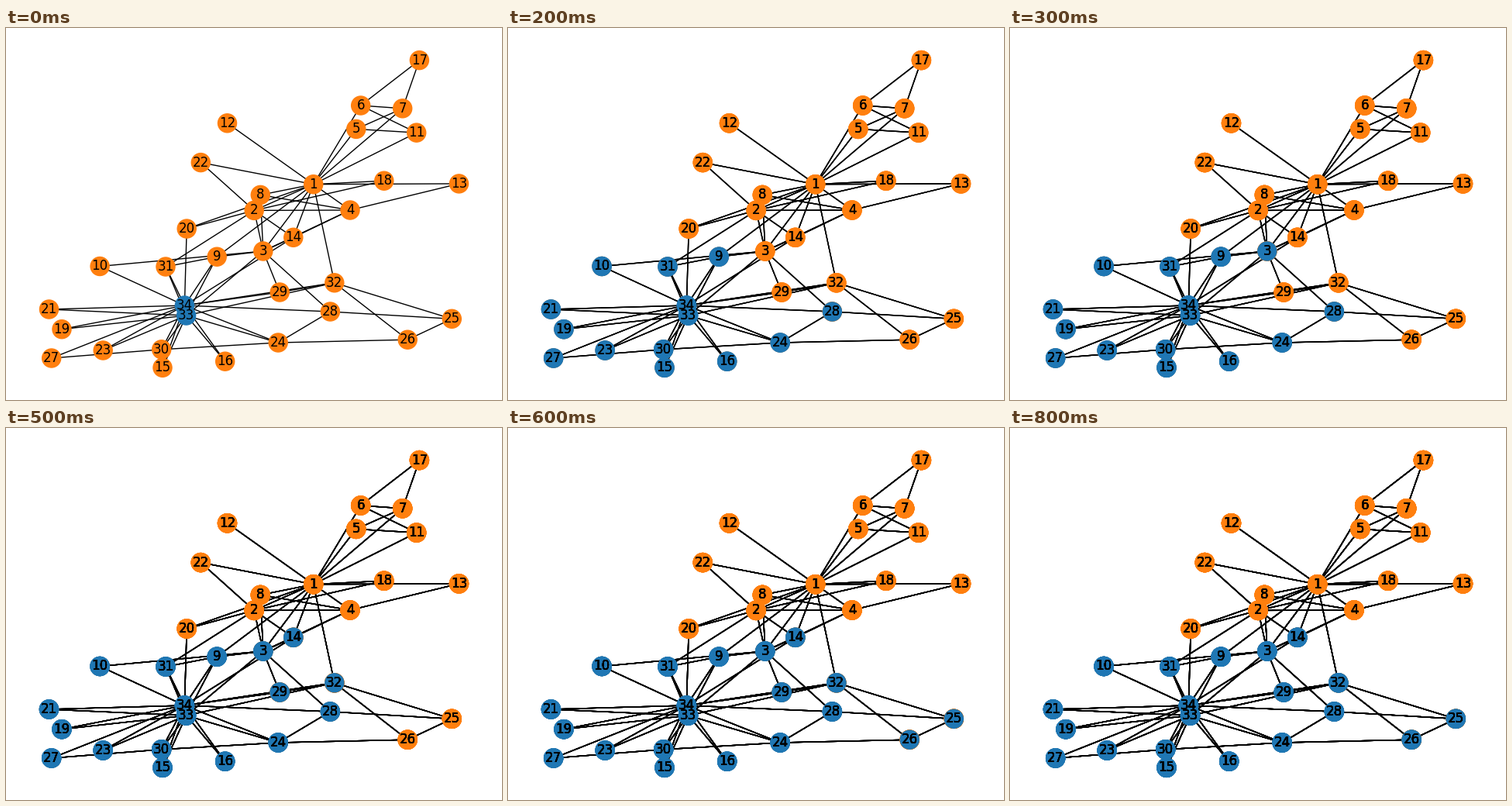
A matplotlib script for the animation above (0.9 s loop, 640 by 480 pixels).

```python
from itertools import combinations, product

import matplotlib.pyplot as plt
from matplotlib.animation import FuncAnimation
from matplotlib.collections import LineCollection

W, H, DPI = 640, 480, 100
STEPS, INTERVAL = 9, 100
ORANGE, BLUE = "#ff7f0e", "#1f77b4"

# Node centres in pixels, in node order from 1
POINTS = [
    (396.7, 201.7), (320.2, 235.4), (331.8, 288), (444, 235), (451.8, 130.4),
    (457.7, 100), (511.7, 103.8), (328.3, 215.4), (272.2, 295.2), (121.1, 307.5),
    (529.7, 135.1), (285.5, 122.8), (584.5, 200.9), (370.8, 270.3),
    (202, 438.3), (282.7, 430.2), (533.4, 41.6), (487.8, 197.2), (72, 388.7),
    (233.2, 259), (55.5, 363), (251.3, 173.6), (125.2, 416), (351.2, 406),
    (575.3, 375.3), (518.2, 402.2), (58.7, 426), (418.4, 366), (353.2, 341),
    (200.7, 414.8), (206, 308), (423.8, 328.8), (232.6, 371), (230.4, 358),
]
POS = dict(enumerate(POINTS, 1))

# The graph as a core where all know each other, plus groups:
# every node on the left is linked to every node on the right
CORE = range(1, 5)
HUBS = (33, 34)
GROUPS = [
    (CORE, [8, 14]),
    ([1, 2], range(18, 23, 2)),
    ([1, 4], [13]),
    ([1, 3], [9]),
    ([1], [5, 6, 7, 11, 12, 32]),
    ([5, 6], [7, 11]),
    ([6, 7], [17]),
    ([3], [10, 28, 29, 33]),
    ([2, 9], [31]),
    ([24, 25], [26, 28]),
    ([25, 26, 29], [32]),
    ([24, 27], [30]),
    (HUBS, [9, 15, 16, 19, 21, 23, 24, 30, 31, 32]),
    ([34], [10, 14, 20, 27, 28, 29, 33]),
]
EDGES = list(combinations(CORE, 2))
for left, right in GROUPS:
    EDGES += product(left, right)

NEIGHBOURS = {n: set() for n in POS}
for a, b in EDGES:
    NEIGHBOURS[a].add(b)
    NEIGHBOURS[b].add(a)


def spread(active):
    """A node switches once two fifths of its neighbours have."""
    return active | {n for n, near in NEIGHBOURS.items()
                     if 5 * len(near & active) >= 2 * len(near)}


def draw_graph(ax, active):
    lines = LineCollection([(POS[a], POS[b]) for a, b in EDGES],
                           colors="black", linewidths=1, zorder=1)
    ax.add_collection(lines, autolim=False)
    colors = [BLUE if n in active else ORANGE for n in POS]
    nodes = ax.scatter(*zip(*POINTS), s=300, c=colors, zorder=2)
    labels = [ax.text(x, y, str(n), size=12, family="DejaVu Sans",
                      ha="center", va="center", zorder=3)
              for n, (x, y) in POS.items()]
    return [lines, nodes, *labels]


fig = plt.figure(figsize=(W / DPI, H / DPI), dpi=DPI, facecolor="white")
ax = fig.add_axes([0, 0, 1, 1])
ax.axis("off")

# Each step is painted over the ones before it, so strokes grow heavier
layers = []
active = set(HUBS)
for _ in range(STEPS):
    layers.append(draw_graph(ax, active))
    active = spread(active)

ax.set_xlim(0, W)
ax.set_ylim(H, 0)


def update(step):
    for i, layer in enumerate(layers):
        for artist in layer:
            artist.set_visible(i <= step)
    return []


anim = FuncAnimation(fig, update, frames=STEPS, interval=INTERVAL,
                     repeat=True, repeat_delay=0, blit=False)
plt.show()
```
